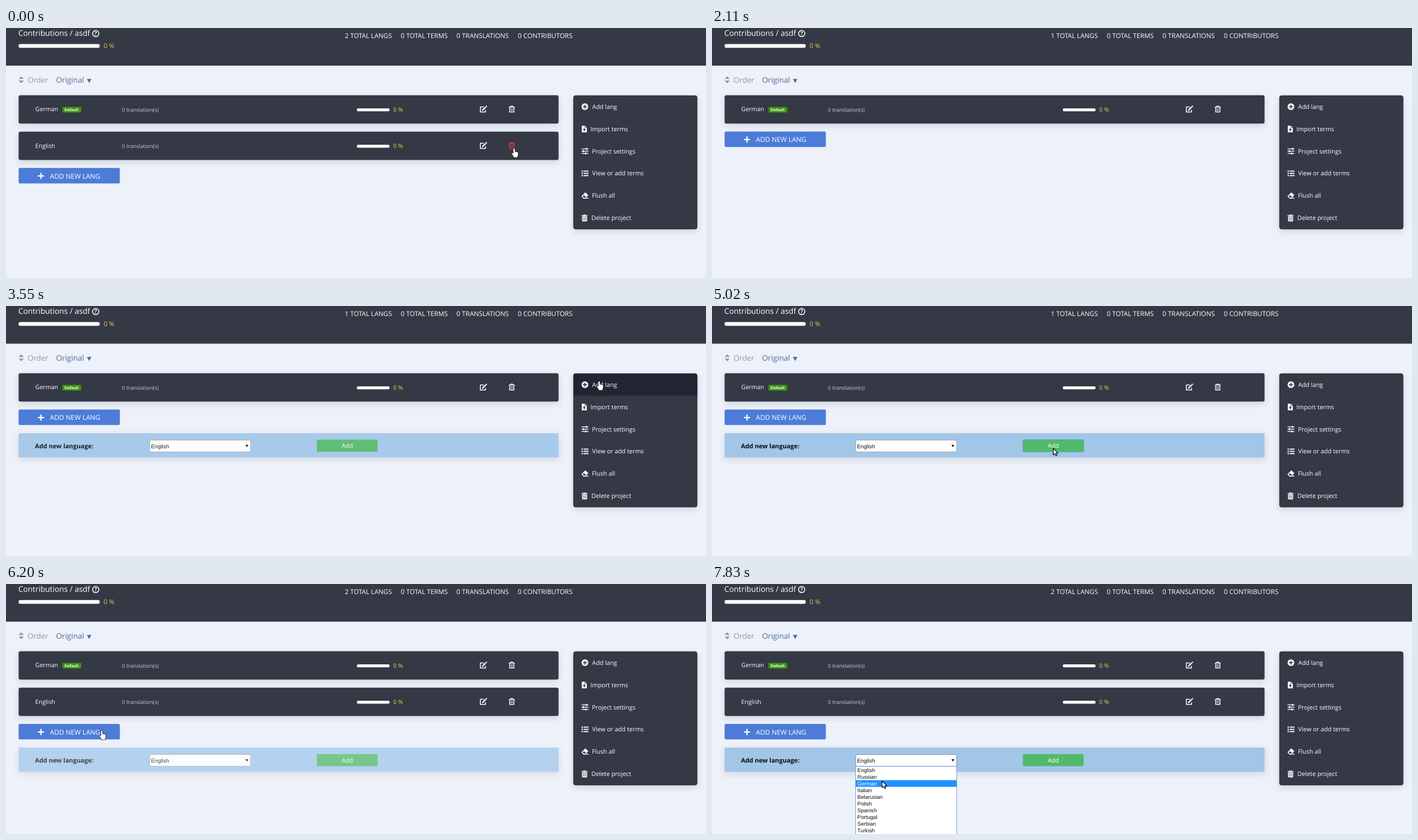
Recreate the animation shown at these times as an HTML page with a canvas. Size 1251 px wide and 448 px high, loop 8000 ms.

```html
<!DOCTYPE html>
<html lang="en">
<head>
<meta charset="utf-8">
<title>Project languages</title>
<style>
html, body { margin: 0; width: 100%; height: 100%; overflow: hidden; background: #edf1f9; }
canvas { display: block; width: 1251px; height: 448px; }
</style>
</head>
<body>
<canvas id="stage" width="1251" height="448"></canvas>
<script>
const LOOP = 8000;
const SANS = '"Open Sans", "Noto Sans", sans-serif';
const ARIAL = '"Liberation Sans", Arial, sans-serif';
const BG = '#edf1f9', DARK = '#353945', WHITE = '#fff';

const canvas = document.getElementById('stage');
const ratio = window.devicePixelRatio || 1;
canvas.width = 1251 * ratio;
canvas.height = 448 * ratio;
const ctx = canvas.getContext('2d');
ctx.scale(ratio, ratio);
ctx.textRendering = 'geometricPrecision';

// Pointer glides: start, end, step count, from, to
const GLIDES = [
  [560, 1170, 5, 908, 216, 720, -18],
  [2410, 3120, 6, 740, 13, 1060, 135],
  [3700, 4580, 7, 1060, 135, 584, 254],
  [4730, 4730, 1, 584, 254, 610, 255],
  [5170, 5920, 6, 610, 255, 171, 263],
  [6345, 6775, 4, 171, 263, 320, 315],
  [7220, 7830, 5, 320, 315, 304, 353]
];
// Opacity of the form over time
const FADES = [[0, 0], [3400, 0.05], [3550, 0.92], [3700, 1], [5170, 0], [6200, 0.76], [6345, 1]];

const LANGS = ['English', 'Russian', 'German', 'Italian', 'Belarusian', 'Polish',
  'Spanish', 'Portugal', 'Serbian', 'Turkish'];

const HAND = new Path2D('M-1.3 9.5V1.2a1.3 1.3 0 0 1 2.6 0V6q1.3-1 2.2.3 1.2-.8 2 .4 1.4-.4 1.5 1v3.2' +
  'q0 2-1.2 3.6v1.3h-6.3v-1.2q-1.4-1.6-2.3-3.3l-1.4-2.2q-.4-1.6 1.2-1.2z');
const ARROW = new Path2D('M0 0V11.8L2.7 9.3 4.6 13.6 6.5 12.8 4.7 8.6H8.3Z');

function pointerAt(t) {
  let pos = { x: 908, y: 216 };
  for (const [t0, t1, n, x0, y0, x1, y1] of GLIDES) {
    if (t < t0) break;
    const k = t >= t1 ? n : Math.floor((t - t0) / (t1 - t0) * (n - 1) + 0.01) + 1;
    const p = k / n, e = p * p * (3 - 2 * p);
    pos = { x: x0 + (x1 - x0) * e, y: y0 + (y1 - y0) * e };
  }
  return pos;
}

function fadeAt(t) {
  let a = 0;
  for (const [time, value] of FADES) if (t >= time) a = value;
  return a;
}

function text(str, x, y, size, color, weight = 400, family = SANS) {
  ctx.font = `${weight} ${size}px ${family}`;
  ctx.fillStyle = color;
  ctx.fillText(str, x, y);
}

function box(x, y, w, h, r, fill, stroke) {
  ctx.beginPath();
  ctx.roundRect(x, y, w, h, r);
  if (fill) { ctx.fillStyle = fill; ctx.fill(); }
  if (stroke) { ctx.strokeStyle = stroke; ctx.stroke(); }
}

function card(x, y, w, h, r, fill) {
  ctx.save();
  ctx.shadowColor = 'rgba(50, 60, 90, 0.16)';
  ctx.shadowBlur = 12 * ratio;
  ctx.shadowOffsetY = 4 * ratio;
  box(x, y, w, h, r, fill);
  ctx.restore();
}

function poly(color, ...pts) {
  ctx.beginPath();
  for (let i = 0; i < pts.length; i += 2) ctx.lineTo(pts[i], pts[i + 1]);
  ctx.closePath();
  ctx.fillStyle = color;
  ctx.fill();
}

function line(color, width, ...pts) {
  ctx.beginPath();
  for (let i = 0; i < pts.length; i += 2) ctx.lineTo(pts[i], pts[i + 1]);
  ctx.strokeStyle = color;
  ctx.lineWidth = width;
  ctx.stroke();
  ctx.lineWidth = 1;
}

function disc(x, y, r, color) {
  ctx.beginPath();
  ctx.arc(x, y, r, 0, 7);
  ctx.fillStyle = color;
  ctx.fill();
}

function editIcon(x, y) {
  line(WHITE, 1.5, x + 7, y + 2.2, x + 0.8, y + 2.2, x + 0.8, y + 11.4, x + 10, y + 11.4, x + 10, y + 7.5);
  line(WHITE, 2.4, x + 5, y + 7.7, x + 10.3, y + 2.4);
  line(WHITE, 2.4, x + 10.8, y + 1.9, x + 12.3, y + 0.4);
  poly(WHITE, x + 3.6, y + 9.2, x + 4, y + 6.6, x + 6.2, y + 8.8);
}

function binIcon(x, y, color) {
  line(color, 1.4, x, y + 2.4, x + 10.6, y + 2.4);
  line(color, 1.3, x + 3, y + 2, x + 3.8, y + 0.7, x + 6.8, y + 0.7, x + 7.6, y + 2);
  line(color, 1.4, x + 1.5, y + 2.5, x + 1.5, y + 11.3, x + 9.1, y + 11.3, x + 9.1, y + 2.5);
  line(color, 1, x + 4.1, y + 4.3, x + 4.1, y + 9.6);
  line(color, 1, x + 6.5, y + 4.3, x + 6.5, y + 9.6);
}

function header(total) {
  ctx.fillStyle = DARK;
  ctx.fillRect(0, 0, 1251, 67.5);
  text('Contributions / asdf', 22, 14.3, 13.85, WHITE);
  ctx.beginPath();
  ctx.arc(160.3, 9.9, 5.6, 0, 7);
  ctx.strokeStyle = WHITE;
  ctx.lineWidth = 1.5;
  ctx.stroke();
  ctx.lineWidth = 1;
  text('?', 157.9, 13.3, 9.5, WHITE, 700);
  box(22.5, 28.7, 145, 6.8, 3, WHITE);
  text('0 %', 174.5, 35.6, 11.5, '#f5bd4f');
  text(total + ' TOTAL LANGS', 605.5, 18.2, 11.7, WHITE);
  text('0 TOTAL TERMS', 705.5, 18.2, 11.7, WHITE);
  text('0 TRANSLATIONS', 805, 18.2, 11.8, WHITE);
  text('0 CONTRIBUTORS', 914.7, 18.2, 11.8, WHITE);
}

function sorter() {
  const grey = '#8f97a6', blue = '#506a9c';
  poly(grey, 27.2, 86.6, 31.8, 91.3, 22.6, 91.3);
  poly(grey, 22.6, 94.2, 31.8, 94.2, 27.2, 98.9);
  text('Order', 38.5, 98, 13.5, grey);
  text('Original', 89.4, 98, 13.7, blue);
  poly(blue, 144.6, 91.3, 152.6, 91.3, 148.6, 98.6);
}

function row(name, y, main, hot) {
  card(22.5, y, 965, 50.7, 3, DARK);
  text(name, 52.3, y + 28.9, 10.75, WHITE);
  if (main) {
    box(100.8, y + 20.8, 33.6, 10.2, 1.5, '#3a9411');
    text('Default', 104.6, y + 28.4, 6.8, WHITE, 700);
  }
  text('0 translation(s)', 207, y + 29, 9.5, '#c8cad0');
  box(627, y + 23.6, 58.5, 5.2, 2.5, WHITE);
  text('0 %', 692, y + 29, 10.4, '#f2cf4e');
  editIcon(846.9, y + 18.7);
  binIcon(898.6, y + 18.7, hot ? '#d9403f' : WHITE);
}

function addButton(y) {
  box(22.5, y, 181, 27.8, 2.5, '#4c7cd8');
  line(WHITE, 2.3, 57, y + 14.4, 68, y + 14.4);
  line(WHITE, 2.3, 62.5, y + 8.9, 62.5, y + 19.9);
  text('ADD NEW LANG', 78.6, y + 18.9, 12, WHITE);
}

function form(y, alpha, focus, open) {
  if (!alpha) return;
  card(22.5, y, 965, 43.2, 0, '#a2c6e8');
  text('Add new language:', 51.7, y + 26.7, 11.15, '#0b0d10', 700);
  box(257, y + 12.3, 180, 21.2, 2, WHITE, open ? '#7193bd' : '#a3a7ac');
  text('English', 259.2, y + 26.7, 9.8, '#111', 400, ARIAL);
  poly('#111', 428, y + 20.8, 433, y + 20.8, 430.5, y + 25.2);
  box(555.6, y + 11.5, 108.6, 21.8, 2, '#52b96a', focus && '#5b9fc0');
  text('Add', 600, y + 26.4, 10.8, WHITE);
  if (alpha < 1) {
    ctx.globalAlpha = 1 - alpha;
    ctx.fillStyle = BG;
    ctx.fillRect(4, y - 10, 1002, 75);
    ctx.globalAlpha = 1;
  }
}

function options(picked) {
  ctx.fillStyle = WHITE;
  ctx.fillRect(257, 327, 180, 122);
  LANGS.forEach((name, i) => {
    const y = 327.5 + i * 12;
    if (i === picked) {
      ctx.fillStyle = '#1e90ff';
      ctx.fillRect(257, y, 180, 12);
    }
    text(name, 259.8, y + 9.2, 9.6, i === picked ? WHITE : '#111', 400, ARIAL);
  });
  ctx.strokeStyle = '#6f9bd6';
  ctx.strokeRect(256.5, 326.8, 180.8, 130);
}

const MENU = [
  ['Add lang', 1047.5, c => {
    disc(1034.6, 141, 6, WHITE);
    line(c, 1.7, 1031, 141, 1038.2, 141);
    line(c, 1.7, 1034.6, 137.4, 1034.6, 144.6);
  }],
  ['Import terms', 1044.5, c => {
    poly(WHITE, 1029, 175, 1034.7, 175, 1038, 178.3, 1038, 187, 1029, 187);
    line(c, 0.8, 1034.6, 175, 1034.6, 178.5, 1038, 178.5);
    poly(c, 1033.5, 179.3, 1036.3, 182.4, 1030.7, 182.4);
    line(c, 1.6, 1033.5, 182, 1033.5, 185);
  }],
  ['Project settings', 1047.2, () => {
    [1037.5, 1032, 1036].forEach((x, i) => {
      const y = 216.6 + i * 4.1;
      line(WHITE, 1.4, 1028.6, y, 1041, y);
      line(WHITE, 2, x, y - 1.8, x, y + 1.8);
    });
  }],
  ['View or add terms', 1047.5, () => {
    for (let y = 256.5; y < 266; y += 4) {
      line(WHITE, 2.2, 1028.6, y, 1031, y);
      line(WHITE, 1.9, 1032.3, y, 1041, y);
    }
  }],
  ['Flush all', 1047.2, c => {
    poly(WHITE, 1028.4, 301.4, 1035.4, 294.6, 1040.6, 299.6, 1035.4, 305.4, 1032, 305.4);
    poly(c, 1030.6, 301.4, 1032.7, 299.4, 1036.6, 303, 1035, 304.3, 1032.9, 304.3);
    line(WHITE, 1.4, 1032, 304.8, 1041, 304.8);
  }],
  ['Delete project', 1046.2, c => {
    line(WHITE, 1.5, 1028.7, 336, 1039.3, 336);
    line(WHITE, 1.3, 1032, 335, 1036, 335);
    box(1029.5, 337.4, 9, 9, 1, WHITE);
    for (let x = 1031.7; x < 1037; x += 2.3) line(c, 0.8, x, 339, x, 345);
  }]
];

function sidebar(hover) {
  card(1014, 121, 221.3, 239.5, 4, DARK);
  if (hover) box(1014, 121, 221.3, 39.8, [4, 4, 0, 0], '#232433');
  box(1014, 121, 221.3, 239.5, 4, null, 'rgba(25, 27, 36, 0.45)');
  MENU.forEach(([label, x, icon], i) => {
    icon(hover && i === 0 ? '#232433' : DARK);
    text(label, x, 144.9 + i * 39.85, 10.9, WHITE);
  });
}

function pointer({ x, y }, hand) {
  ctx.save();
  ctx.translate(x, y);
  const shape = hand ? HAND : ARROW;
  ctx.lineJoin = 'round';
  ctx.strokeStyle = '#111';
  ctx.lineWidth = hand ? 1.4 : 1.1;
  ctx.fillStyle = WHITE;
  ctx.stroke(shape);
  ctx.fill(shape);
  if (!hand) ctx.stroke(shape);
  ctx.restore();
}

function draw(t) {
  const pos = pointerAt(t);
  const two = t < 2110 || t >= 5170;
  const shift = two ? 65.2 : 0;
  const open = t >= 6920;
  const overBin = t < 560;
  const overMenu = pos.x > 1014 && pos.y > 121;
  const overAdd = two && pos.x < 203 && pos.y > 250 && pos.y < 278;

  ctx.fillStyle = BG;
  ctx.fillRect(0, 0, 1251, 448);
  header(two ? 2 : 1);
  sorter();
  row('German', 120.5, true, false);
  if (two) row('English', 185.7, false, overBin);
  form(228 + shift, fadeAt(t), t >= 5020 && t < 5170, open);
  addButton(185.5 + shift);
  sidebar(overMenu);
  if (open) options(Math.max(0, Math.floor((pos.y - 327.5) / 12)));
  if (t < 1170 || t >= 2410) pointer(pos, overBin || overMenu || overAdd);
}

const start = performance.now();
function tick() {
  draw((performance.now() - start) % LOOP);
  requestAnimationFrame(tick);
}
tick();
</script>
</body>
</html>
```
